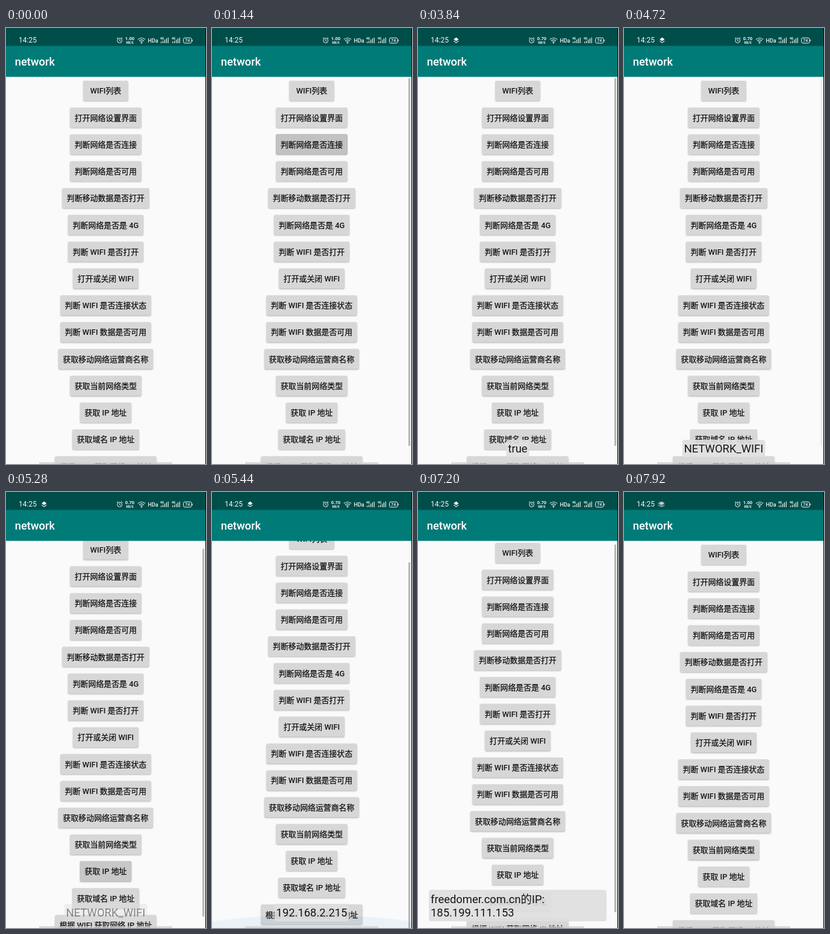
Write an HTML page that moves like this. It is 332x719 px and loops after 8 s.

```html
<!DOCTYPE html>
<html lang="zh-CN">
<head>
<meta charset="utf-8">
<style>
html, body { margin: 0; width: 100%; height: 100%; overflow: hidden; background: #fafafa; }
svg { display: block; width: 332px; height: 719px; font-family: Roboto, "Noto Sans CJK SC", "Noto Sans CJK", sans-serif; }
.label { font-size: 12.9px; font-weight: 500; text-anchor: middle; fill: #151515; }
.han { stroke: #151515; stroke-width: .28px; }
.toast { font-size: 18.4px; fill: #151515; }
.status { fill: #f0f6f5; }
.line { fill: none; stroke: #f0f6f5; }
</style>
</head>
<body>
<svg id="stage" viewBox="0 0 332 719">
  <defs>
    <filter id="soft" x="-10%" y="-20%" width="120%" height="150%"><feGaussianBlur stdDeviation="0.9"/></filter>
    <clipPath id="page"><rect y="80" width="332" height="639"/></clipPath>
    <path id="layers" d="M63.3 15.6l4.1 3.1-4.1 3.1-4.1-3.1zM59.2 20.8l4.1 3 4.1-3v1.1l-4.1 3-4.1-3z"/>
    <g id="signal">
      <text x="0" y="19.3" font-size="5" font-weight="700">4G</text>
      <path d="M1 22.5h1.2V25H1zM4 21h1.2v4H4zM7 19.3h1.2V25H7zM9.8 17.3H11V25H9.8zM12.6 15.8h1.2V25h-1.2z"/>
    </g>
  </defs>
  <rect width="332" height="719" fill="#fafafa"/>
  <g clip-path="url(#page)">
    <g id="list"></g>
    <rect id="thumb" x="326" width="3.4" height="606" fill="#b9b9b9"/>
    <path id="glowTop" d="M0 80H332V92Q166 114 0 92z" fill="#0070c0"/>
    <path id="glowBottom" d="M0 708Q166 686 332 708V719H0z" fill="#0070c0"/>
  </g>
  <rect x="55" y="716" width="221" height="3" fill="#d0d0d0" opacity=".75"/>
  <g id="toasts"></g>

  <rect y="29" width="332" height="51.6" fill="#007b78"/>
  <rect width="332" height="29.5" fill="#004e4a"/>
  <text x="14.7" y="62" font-size="18.4" font-weight="500" fill="#fff">network</text>
  <g class="status">
    <text x="21" y="24.4" font-size="12">14:25</text>
    <use id="iconGhost" href="#layers" x="-3"/>
    <use id="icon" href="#layers"/>
    <circle class="line" cx="188.7" cy="20.7" r="3.9"/>
    <path class="line" d="M188.7 18.4v2.6l1.7 1M184 17.4l2.2-1.9M193.4 17.4l-2.2-1.9"/>
    <text id="speed" x="205.5" y="19.8" font-size="7.6" font-weight="700" text-anchor="middle">1.00</text>
    <text x="205.5" y="26" font-size="5.4" font-weight="700" text-anchor="middle">KB/S</text>
    <path class="line" stroke-width="1.2" d="M219 18.9q6-4.8 12 0M221 21.2q4-3.2 8 0M223 23.3q2-1.6 4 0"/>
    <circle cx="225" cy="24.7" r="1"/>
    <text x="235.5" y="24.2" font-size="9" font-weight="500">HDa</text>
    <use href="#signal" x="256"/>
    <use href="#signal" x="275"/>
    <rect class="line" x="294.5" y="16.2" width="13.4" height="8.8" rx="2.4"/>
    <path d="M308.6 19h1.1v3.2h-1.1z"/>
    <text x="301.2" y="23.2" font-size="7" font-weight="500" text-anchor="middle">74</text>
  </g>
  <rect x="331" width="1" height="719"/>
</svg>
<script>
const LOOP = 8000, STEP = 80, CENTER = 165.5;
const byId = id => document.getElementById(id);
const clamp = v => Math.max(0, Math.min(1, v));
const ramp = (t, from, to) => clamp((t - from) / (to - from));
const show = (node, alpha) => node.setAttribute('opacity', alpha);

function add(parent, tag, attrs, text) {
  const node = document.createElementNS('http://www.w3.org/2000/svg', tag);
  for (const key in attrs) node.setAttribute(key, attrs[key]);
  if (text) node.textContent = text;
  return parent.appendChild(node);
}

const buttons = [
  ['WIFI列表', 74], ['打开网络设置界面', 118], ['判断网络是否连接', 118],
  ['判断网络是否可用', 118], ['判断移动数据是否打开', 144], ['判断网络是否是 4G', 125],
  ['判断 WIFI 是否打开', 125], ['打开或关闭 WIFI', 108.5], ['判断 WIFI 是否连接状态', 150],
  ['判断 WIFI 数据是否可用', 150], ['获取移动网络运营商名称', 157], ['获取当前网络类型', 118],
  ['获取 IP 地址', 85], ['获取域名 IP 地址', 110.5], ['根据 WIFI 获取网络 IP 地址', 168]
];
// button index, touch down, touch up
const presses = [[2, 1280, 1760], [6, 2160, 2640], [8, 3360, 3600], [11, 4160, 4480], [12, 5040, 5200], [13, 5920, 6240]];
const toastLines = [['true'], ['true'], ['true'], ['NETWORK_WIFI'], ['192.168.2.215'], ['freedomer.com.cn的IP:', '185.199.111.153']];
const toastEnd = 7680;
// scrollbar shown, fade start
const barSpans = [[1360, 1760], [2240, 2640], [3440, 4560], [5120, 5600], [6000, 6400], [7200, 7680]];

// Han runs get a thin outline so they match the medium Latin weight.
function addLabel(parent, label, y) {
  const text = add(parent, 'text', { x: CENTER, y, class: 'label' });
  for (const run of label.match(/\p{Script=Han}+|\P{Script=Han}+/gu))
    add(text, 'tspan', /\p{Script=Han}/u.test(run) ? { class: 'han' } : {}, run);
}

const overlays = buttons.map(([label, width], i) => {
  const list = byId('list');
  const y = 87 + i * 44.23, x = CENTER - width / 2;
  const box = { x, y, width, height: 33, rx: 1.8 };
  add(list, 'rect', { ...box, y: y + 1.1, fill: '#000', opacity: .28, filter: 'url(#soft)' });
  add(list, 'rect', { ...box, fill: '#d7d7d7' });
  const overlay = add(list, 'rect', { ...box, fill: '#c2c2c2', stroke: '#b2b2b2', 'stroke-width': .8 });
  addLabel(list, label, y + 21.4);
  return overlay;
});

const toasts = toastLines.map(lines => {
  const group = add(byId('toasts'), 'g', {});
  const wide = lines.length > 1;
  const box = add(group, 'rect', { rx: 4, fill: '#dfdfdf', 'fill-opacity': .9 });
  const texts = lines.map((line, i) => add(group, 'text', {
    class: 'toast', x: wide ? 21 : CENTER, y: (wide ? 678 : 700) + i * 22, 'text-anchor': wide ? 'start' : 'middle'
  }, line));
  const width = wide ? 295 : texts[0].getComputedTextLength() + 6;
  const attrs = { x: CENTER - width / 2, y: wide ? 656 : 679, width, height: wide ? 52 : 29 };
  for (const key in attrs) box.setAttribute(key, attrs[key]);
  return group;
});

function scrollAt(t) {
  if (t < 7120) return 26 * ramp(t, 5200, 5440);
  return t < 7200 ? 26 - 23 * ramp(t, 7120, 7200) : 3 * (1 - ramp(t, 7200, 7280));
}

function draw(t) {
  const scroll = scrollAt(t);
  byId('list').setAttribute('transform', `translate(0 ${-scroll})`);
  byId('thumb').setAttribute('y', 83 + scroll * 33 / 26);
  show(byId('thumb'), Math.max(...barSpans.map(([on, fade]) => t < on ? 0 : 1 - ramp(t, fade, fade + 200))));

  overlays.forEach(node => show(node, 0));
  for (const [i, down, up] of presses)
    show(overlays[i], ramp(t, down - 80, down + 160) * (1 - ramp(t, up, up + 240)));

  toasts.forEach((node, i) => {
    const start = presses[i][2];
    const end = i + 1 < presses.length ? presses[i + 1][2] : toastEnd;
    show(node, ramp(t, start + 80, start + 240) * (1 - ramp(t, end, end + 160)));
  });

  show(byId('glowBottom'), .06 * ramp(t, 5280, 5440) * (1 - ramp(t, 5480, 5840)));
  show(byId('glowTop'), .06 * ramp(t, 7200, 7280) * (1 - ramp(t, 7320, 7520)));

  const leaving = t >= 7920;
  show(byId('icon'), t < 1760 ? 0 : leaving ? .7 : 1);
  show(byId('iconGhost'), leaving ? .5 : 0);
  byId('speed').textContent = t >= 3440 && t < 7760 ? '0.70' : '1.00';
}

const origin = performance.now();
function tick() {
  const t = (performance.now() - origin) % LOOP;
  draw(Math.floor(t / STEP) * STEP);
  requestAnimationFrame(tick);
}
tick();
</script>
</body>
</html>
```
